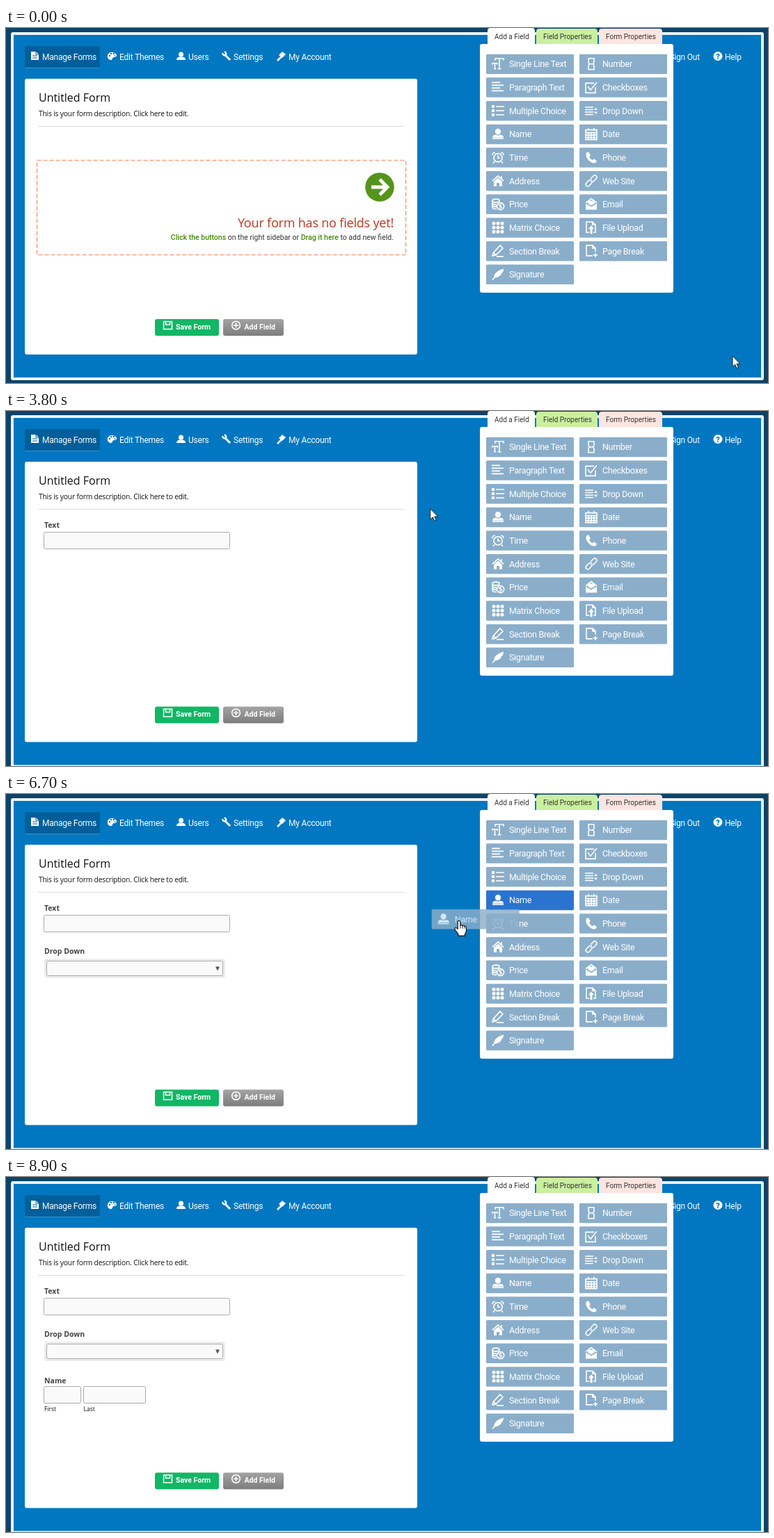
Animation of 1095x511 px, one loop 9700 ms. Source, as an HTML page:

```html
<!DOCTYPE html>
<html lang="en">
<head>
<meta charset="utf-8">
<title>Form builder</title>
<style>
  html, body { margin: 0; width: 100%; height: 100%; overflow: hidden; background: #0c4367; }
  svg { display: block; width: 1095px; height: 511px; }
  text { font-family: Roboto, sans-serif; white-space: pre; }
  .menu { font-size: 12px; letter-spacing: -.2px; fill: #fff; }
  .tab { font-size: 10px; fill: #333; }
  .button { font-size: 12.5px; letter-spacing: -.3px; fill: #fff; }
  .action { font-size: 10.5px; font-weight: 700; fill: #fff; }
  .plain, .label { font-family: "Open Sans", sans-serif; fill: #111; }
  .label { font-size: 10.5px; font-weight: 700; fill: #444; }
  .icon { fill: none; stroke: #fff; stroke-width: 1.6; }
  .solid { fill: #fff; }
  .input { fill: #fafafa; stroke: #aaa; }
  .glow { fill: #edf8b0; stroke: #f6b58c; stroke-dasharray: 2 1; }
</style>
</head>
<body>
<svg id="stage" viewBox="0 0 1095 511">
  <defs>
    <linearGradient id="grey" x2="0" y2="1"><stop stop-color="#a3a3a3"/><stop offset="1" stop-color="#7d7d7d"/></linearGradient>
    <filter id="shade" x="-5%" y="-5%" width="110%" height="110%"><feDropShadow dx="0" dy="1" stdDeviation="1.3" flood-opacity=".55"/></filter>
    <path id="handle" d="M0 4V0H4ZM9 0H13V4ZM0 9V13H4ZM13 9V13H9ZM2 2L5 5M11 2L8 5M2 11L5 8M11 11L8 8" fill="#62ad72" stroke="#62ad72"/>
  </defs>

  <rect id="frame" x="9" y="8" width="1078" height="497" rx="1" fill="#0077c0" stroke="#e9f2f8" stroke-width="4"/>

  <g id="menu">
    <rect x="27" y="26" width="108" height="31" rx="3" fill="#005f9b"/>
    <path d="M28 57.5H134" stroke="#3c92c6"/>
    <path class="solid" d="M36 34H43L47 38V46H36Z"/>
    <path d="M38 40H45M38 43H45M43 34V38H47" fill="none" stroke="#005f9b"/>
    <path class="solid" d="M152 35C144 35 144 46 151 46C154 46 152 42 155 42C162 42 159 35 152 35Z"/>
    <path d="M148 40h2M150 37h2M154 37h2M156 40h1" stroke="#0077c0" stroke-width="1.8"/>
    <circle class="solid" cx="251.500" cy="38" r="3.500"/>
    <path class="solid" d="M245 46Q245 41 251.500 41.500Q258 41 258 46Z"/>
    <path class="icon" stroke-width="2" d="M314 38L322 46" style="stroke-width:3"/>
    <path class="icon" d="M311 36Q312 40 315 39Q318 37 314 34" style="stroke-width:2.400"/>
    <path class="icon" d="M390 47L397 40" style="stroke-width:2.600"/>
    <path class="solid" d="M392 39L397 34L402 38L397 43Z"/>
    <circle class="solid" cx="1023" cy="40.500" r="6.500"/>
    <text x="1023" y="45" text-anchor="middle" font-size="11" font-weight="900" fill="#0077c0">?</text>
    <text class="menu" x="52" y="46">Manage Forms</text>
    <text class="menu" x="163" y="46">Edit Themes</text>
    <text class="menu" x="262" y="46">Users</text>
    <text class="menu" x="327" y="46">Settings</text>
    <text class="menu" x="406" y="46">My Account</text>
    <text class="menu" x="997" y="46" text-anchor="end">Sign Out</text>
    <text class="menu" x="1033" y="46">Help</text>
  </g>

  <rect id="card" x="27" y="73" width="564" height="397" rx="3" fill="#fff"/>
  <text class="plain" x="47" y="106" font-size="16">Untitled Form</text>
  <text class="plain" x="47" y="127" font-size="10.300" letter-spacing="-.2">This is your form description. Click here to edit.</text>
  <path d="M47 141.500H572" stroke="#bbb" stroke-dasharray="1 1"/>

  <g id="empty">
    <rect x="44.500" y="190.500" width="530" height="136" fill="none" stroke="#ffa184" stroke-width="1.700" stroke-dasharray="6 3"/>
    <circle cx="537" cy="229" r="20.800" fill="#55941a"/>
    <path d="M525 229H546M537 218L548 229L537 240" fill="none" stroke="#fff" stroke-width="5"/>
    <text class="plain" x="557" y="287" text-anchor="end" font-size="18" letter-spacing="-.2" style="fill:#b53a1e">Your form has no fields yet!</text>
    <text x="557" y="305" text-anchor="end" font-size="10.500" fill="#333"><tspan fill="#438a0b" font-weight="500">Click the buttons</tspan> on the right sidebar or <tspan fill="#438a0b" font-weight="500">Drag it here</tspan> to add new field.</text>
  </g>

  <g id="slot">
    <rect class="glow" x="46.500" width="538" height="31"/>
    <use href="#handle" x="560" y="5"/>
  </g>

  <g id="field0">
    <g class="hot"><rect class="glow" x="46.500" y="153.500" width="538" height="59"/><use href="#handle" x="560" y="158"/></g>
    <text class="label" x="55" y="168">Text</text>
    <rect class="input" x="54.500" y="174.500" width="267" height="24" rx="2"/>
  </g>
  <g id="field1">
    <g class="hot"><rect class="glow" x="46.500" y="215.500" width="538" height="59"/><use href="#handle" x="560" y="220"/></g>
    <text class="label" x="55" y="230">Drop Down</text>
    <rect x="55" y="237" width="260" height="28" rx="4" fill="#ececec"/>
    <rect class="input" x="58.500" y="240.500" width="253" height="21" rx="2"/>
    <path d="M301 248.500H307L304 254.500Z" fill="#555"/>
  </g>
  <g id="field2">
    <g class="hot"><rect class="glow" x="46.500" y="281.500" width="538" height="63"/><use href="#handle" x="560" y="286"/></g>
    <text class="label" x="55" y="297">Name</text>
    <rect class="input" x="54.500" y="301.500" width="53" height="24" rx="2"/>
    <rect class="input" x="111.500" y="301.500" width="89" height="24" rx="2"/>
    <text class="plain" x="55" y="337" font-size="8.500">First</text>
    <text class="plain" x="111.500" y="337" font-size="8.500">Last</text>
  </g>

  <g id="actions">
    <rect x="214" y="419" width="92" height="24" rx="3" fill="#11b765"/>
    <path class="icon" d="M226.500 422.500H238.500V433.500H226.500ZM229.500 422V427H235.500V422" style="stroke-width:1.500"/>
    <text class="action" x="244" y="433.500">Save Form</text>
    <rect x="312" y="419" width="87" height="24" rx="3" fill="url(#grey)"/>
    <circle class="icon" cx="330.500" cy="428" r="5.800"/>
    <path class="icon" d="M327 428H334M330.500 424.500V431.500"/>
    <text class="action" x="342.500" y="433.500">Add Field</text>
  </g>

  <path d="M692 24V4Q692 0 696 0H756Q760 0 760 4V24Z" fill="#fff"/>
  <path d="M762 23V5Q762 1 766 1H846Q850 1 850 5V23Z" fill="#caf09f"/>
  <path d="M852 23V5Q852 1 856 1H939Q943 1 943 5V23Z" fill="#fee5e1"/>
  <rect id="panel" x="681" y="23" width="278" height="358" rx="3" fill="#fff"/>
  <path d="M693 20H759V27H693Z" fill="#fff"/>
  <text class="tab" x="702" y="16">Add a Field</text>
  <text class="tab" x="772" y="16">Field Properties</text>
  <text class="tab" x="862" y="16">Form Properties</text>
  <g id="buttons"></g>
  <g id="ghosts" opacity=".82"></g>

  <g id="cursor" stroke="#222" fill="#fff" stroke-linejoin="round">
    <path id="arrow" d="M0 0V15.500L3.600 12.200L6 17.600L8.300 16.600L6 11.400H10.800Z"/>
    <g id="hand">
      <path stroke-width="1.300" d="M-2 2Q-.2-1 1.600 2V7.400Q3.400 6 4.800 8Q6.600 6.800 7.800 8.800Q10 8 10.200 10.500V15Q10 18 8.200 20V22.500H-1.200V20L-6 13.500Q-7 11-5 10.600Q-3.600 10.600-2 12.600Z"/>
      <path d="M1.600 7V12M4.800 8V12M7.800 9V12" fill="none"/>
    </g>
  </g>
</svg>

<script>
const LOOP = 9700, STEP = 100, SHIFT = 6.5;
const $ = id => document.getElementById(id);

const dots = [3, 9, 15].map(y => [3, 9, 15].map(x => `M${x - 2.5} ${y}a2.500 2.500 0 1 0 5 0a2.500 2.500 0 1 0-5 0`).join('')).join('');

// label, stroked part, filled part of an 18 x 18 icon
const left = [
  ['Single Line Text', 'M5 4V1H17V4M11 1V16M8.500 16H13.500M1 10V8H8V10M4.500 8V16M3 16H6', ''],
  ['Paragraph Text', 'M0 2H12M0 6H17M0 10H12M0 14H17', ''],
  ['Multiple Choice', 'M6 3H18M6 9H18M6 15H18', 'M0 1h4v4H0ZM0 7h4v4H0ZM0 13h4v4H0Z'],
  ['Name', 'M1 15.500H17', 'M9 1C3 1 4 10 9 10S15 1 9 1ZM1 14Q1 10 6 10Q9 12 12 10Q17 10 17 14Z'],
  ['Time', 'M9 3.500a6 6 0 1 0 .1 0M9 6V10H12M4 15L2 17.500M14 15L16 17.500M1 6Q1 2 5 2M17 6Q17 2 13 2', ''],
  ['Address', 'M1 9.500L9 2L17 9.500M14 2V6', 'M3 10L9 4.500L15 10V17H11V12H7V17H3Z'],
  ['Price', 'M1 4a5 2.500 0 1 0 10 0a5 2.500 0 1 0-10 0V14Q2 16 7 16M1 8Q3 10 7 10M1 11Q3 13 7 13M12.500 7a5 5 0 1 0 .1 0M14 10Q11 9 11 11Q14 12 14 13.500Q12 15 11 14', ''],
  ['Matrix Choice', '', dots],
  ['Section Break', 'M2 12L12 1L16 5L6 15L1 16ZM3 12L6 15M7 17H17', ''],
  ['Signature', 'M1 17L8 9', 'M3 14Q3 5 17 1Q17 7 13 8L14 9Q10 14 3 14Z']
];
const right = [
  ['Number', 'M5 1H13V7L11.500 9L13 11V17H5V11L6.500 9L5 7ZM6 9H12', ''],
  ['Checkboxes', 'M13 3H1V17H15V9M4 8L8 13L17 2', ''],
  ['Drop Down', 'M0 4H12M0 7.500H12M0 11H12M0 14.500H12', 'M13 8L15.500 4.500L18 8ZM13 10.500H18L15.500 14Z'],
  ['Date', 'M1 3H17V17H1ZM1 7H17M1 10.500H17M1 14H17M5 7V17M9 7V17M13 7V17M5 0V4M13 0V4', ''],
  ['Phone', '', 'M2 2L5 1L8 6L6 8Q8 12 11 13L13 11L17 14L15 17Q10 18 5 13Q0 7 2 2Z'],
  ['Web Site', 'M8 6L12 2Q14 0 16 2Q18 4 16 6L12 10Q10 11 8 10M10 8Q8 7 6 8L2 12Q0 14 2 16Q4 18 6 16L10 12', ''],
  ['Email', 'M1 7L9 1L17 7', 'M1 8L9 13L17 8V17H1ZM4 4H14V8L9 11L4 8Z'],
  ['File Upload', 'M6 16H2V1H11L15 5V16H12M11 1V5H15', 'M9 6L13 11H10.500V18H7.500V11H5Z'],
  ['Page Break', 'M11 16H2V1H11L15 5V10M11 1V5H15M12 15H18M15 12V18', '']
];

const face = ([label, line, solid]) => `
  <rect width="126" height="28.500" rx="1.500" fill="#8aaeca"/>
  <g transform="translate(8 5)"><path class="icon" d="${line}"/><path class="solid" d="${solid}"/></g>
  <text class="button" x="33" y="18.700">${label}</text>`;

const place = (side, x, hover, drag) => side.map((item, i) => ({ item, x, y: 37.7 + 33.65 * i, hover, drag }));
const buttons = [...place(left, 690, '#73abf0', '#2a74d0'), ...place(right, 824, '#72aa4a', '#53921a')];

const add = (parent, html) => {
  const g = document.createElementNS('http://www.w3.org/2000/svg', 'g');
  g.innerHTML = html;
  return $(parent).appendChild(g);
};
const move = (el, x, y) => el.setAttribute('transform', `translate(${x} ${y})`);
const show = (el, on) => el.setAttribute('visibility', on ? 'inherit' : 'hidden');

for (const b of buttons) {
  b.rect = add('buttons', face(b.item));
  move(b.rect, b.x, b.y);
  b.rect = b.rect.querySelector('rect');
}

// Each drag: press and drop times, when its slot opens, and the carried copy's path
const drags = [
  { button: 0, from: 2100, to: 3100, slot: 2700, slotY: 153.5, fade: 3180, path: [[2200, 690, 38], [3000, 160, 165]] },
  { button: 12, from: 4200, to: 5300, slot: 5000, slotY: 215.5, fade: 5350, path: [[4200, 824, 105], [4800, 733, 143], [5200, 528, 203]] },
  { button: 3, from: 6400, to: 7600, slot: 7000, slotY: 281.5, fade: 7600, path: [[6500, 690, 139], [7200, 295, 275.5], [7500, 222, 277]] }
];
drags.forEach((d, i) => {
  d.ghost = add('ghosts', face(buttons[d.button].item));
  d.field = $('field' + i);
  d.hot = d.field.querySelector('.hot');
  d.hotBox = d.hot.querySelector('rect');
});

const cursorPath = [
  [0, 1044, 472], [1000, 736, 330], [1400, 736, 330], [1900, 739, 48], [2200, 739, 48],
  [3000, 201, 177], [3400, 201, 177], [4100, 875, 117], [4200, 875, 117], [4800, 575, 209],
  [5400, 576, 218], [5800, 576, 218], [6300, 744, 155], [6500, 744, 155], [7200, 276, 290],
  [7500, 248, 294], [7900, 248, 294], [8500, 192, 380], [8900, 245, 515]
];
const handTimes = [[600, 3600], [4000, 4400], [5500, 8000]];

const clamp = (v, lo, hi) => Math.min(hi, Math.max(lo, v));
function along(path, t) {
  const next = path.findIndex(p => p[0] > t);
  if (next < 0) return path[path.length - 1].slice(1);
  if (next === 0) return path[0].slice(1);
  const a = path[next - 1], b = path[next];
  const u = (t - a[0]) / (b[0] - a[0]), e = u * u * (3 - 2 * u);
  return [a[1] + (b[1] - a[1]) * e, a[2] + (b[2] - a[2]) * e];
}
const within = (x, y, bx, by, w, h) => x >= bx && x < bx + w && y >= by && y < by + h;

function draw(t) {
  const [cx, cy] = along(cursorPath, t);
  const filled = t >= drags[0].slot, shift = filled ? SHIFT : 0;
  const hand = handTimes.some(([a, b]) => t >= a && t < b);

  $('frame').setAttribute('height', 497 + shift);
  $('card').setAttribute('height', 397 + shift);
  move($('actions'), 0, shift);
  show($('empty'), !filled);

  const dragging = drags.find(d => t >= d.from && t < d.to);
  for (const b of buttons) {
    const held = dragging && buttons[dragging.button] === b;
    const over = !dragging && within(cx, cy, b.x, b.y, 126, 28.5);
    b.rect.setAttribute('fill', held ? b.drag : over ? b.hover : '#8aaeca');
  }
  if (within(cx, cy, 681, 23, 278, 358)) $('panel').setAttribute('filter', 'url(#shade)');
  else $('panel').removeAttribute('filter');

  const slotOpen = dragging && t >= dragging.slot;
  show($('slot'), slotOpen);
  if (slotOpen) move($('slot'), 0, dragging.slotY);

  for (const d of drags) {
    show(d.ghost, d === dragging && t >= d.path[0][0]);
    move(d.ghost, ...along(d.path, t));
    d.field.setAttribute('opacity', clamp((t - d.fade) / 600, 0, 1));
    const y = +d.hotBox.getAttribute('y'), h = +d.hotBox.getAttribute('height');
    show(d.hot, !dragging && within(cx, cy, 46, y, 539, h));
  }

  move($('cursor'), cx, cy);
  show($('cursor'), t < 8900);
  show($('hand'), t < 8900 && hand);
  show($('arrow'), t < 8900 && !hand);
}

function tick() {
  const t = performance.now() % LOOP;
  draw(Math.floor(t / STEP) * STEP);
  requestAnimationFrame(tick);
}
tick();
</script>
</body>
</html>
```
